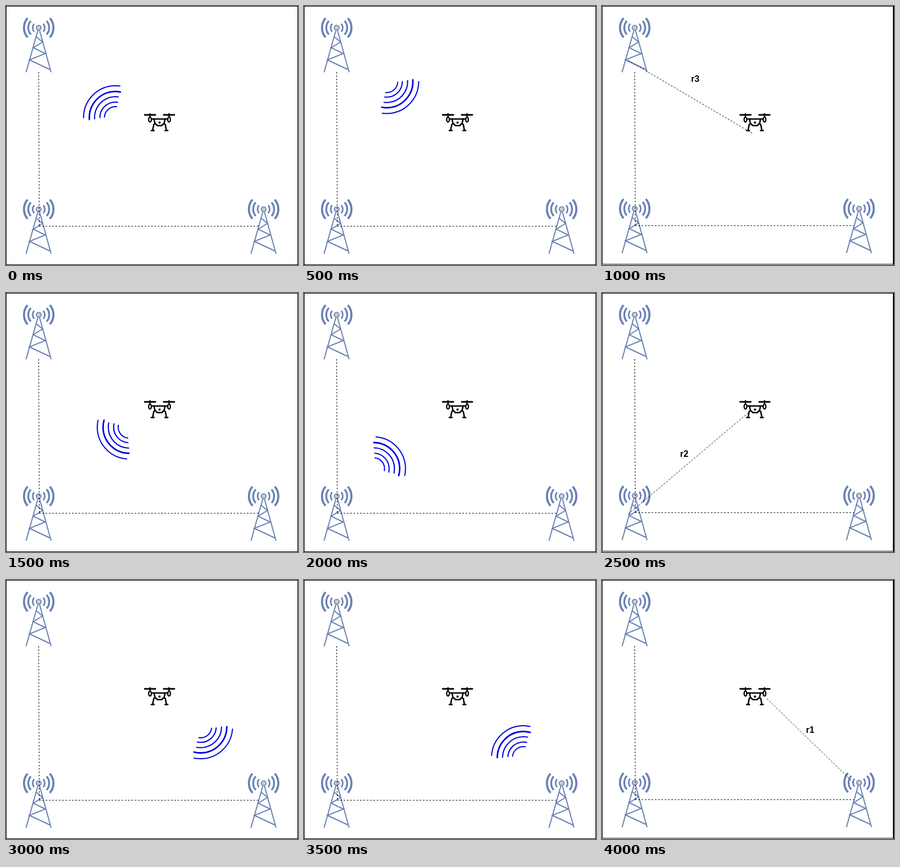
Write an HTML page with a canvas that moves like this. It is 531 by 471 pixels and loops after 4500 ms.

```html
<!DOCTYPE html>
<html lang="en">
<head>
<meta charset="utf-8">
<title>Drone ranging</title>
<style>
  html, body { margin: 0; width: 100%; height: 100%; overflow: hidden; background: #fff; }
  canvas { display: block; }
</style>
</head>
<body>
<canvas id="stage" width="531" height="471"></canvas>
<script>
const ctx = document.getElementById('stage').getContext('2d');
const STEP = 500;
const STEEL = '#6881b3';
const rad = deg => deg * Math.PI / 180;

// Each leg: signal sent, reply received, then the measured range.
const legs = [
  { send: [199, 203, 0], reply: [150.5, 137.5, 180],
    line: [48, 99, 274, 232], label: ['r3', 162, 138] },
  { send: [224, 244, -85.5], reply: [126.5, 319.5, 94.5],
    line: [48, 402, 268, 216], label: ['r2', 142, 298] },
  { send: [354, 267, -176], reply: [399, 323, 4],
    line: [300, 216, 460, 371], label: ['r1', 371, 278] }
];

// Radius, start angle, end angle, line width
const ripples = [
  [58, 180, 278, 2], [47.5, 176, 281, 2.8], [38, 177, 277.5, 2.1],
  [28.3, 180, 278, 2.1], [20, 183, 276, 2]
];

function pen(color, width, cap = 'butt') {
  ctx.strokeStyle = color;
  ctx.lineWidth = width;
  ctx.lineCap = cap;
}

function path(points, close) {
  ctx.beginPath();
  for (let i = 0; i < points.length; i += 2) ctx.lineTo(points[i], points[i + 1]);
  if (close) ctx.closePath();
  ctx.stroke();
}

function dashed(points) {
  pen('#000', 1);
  ctx.setLineDash([3, 3]);
  path(points);
  ctx.setLineDash([]);
}

function at(x, y, draw) {
  ctx.save();
  ctx.translate(x, y);
  draw();
  ctx.restore();
}

// Origin at the antenna
function tower() {
  pen(STEEL, 2);
  path([-1.5, 5, -23, 81]);
  path([1.5, 5, 22.5, 81]);
  path([-5, 16, 7, 26, -10, 36.5, 12, 47, -17, 58.5, 20.5, 76]);
  for (const [r, width] of [[11, 2.8], [19, 3.4], [26.8, 3.8]]) {
    pen(STEEL, width);
    for (const mid of [0, 180]) {
      ctx.beginPath();
      ctx.arc(0, 0, r, rad(mid - 41), rad(mid + 41));
      ctx.stroke();
    }
  }
  pen(STEEL, 1.8);
  ctx.fillStyle = '#ccc';
  ctx.beginPath();
  ctx.arc(0, 0, 4.4, 0, 7);
  ctx.fill();
  ctx.stroke();
}

function drone() {
  for (const side of [-1, 1]) {
    ctx.save();
    ctx.scale(side, 1);
    pen('#000', 2.8, 'round');
    path([7.5, -14, 27, -14]);
    pen('#000', 2.4, 'round');
    path([17.3, -16, 17.3, -11]);
    ctx.beginPath();
    ctx.ellipse(17.3, -5.5, 2.4, 4.4, 0, 0, 7);
    ctx.stroke();
    path([10, -6.5, 15, -6.5]);
    pen('#000', 2.6, 'round');
    path([8, 2, 10.5, 3.5, 12.5, 14]);
    path([10, 14.5, 15, 14.5]);
    ctx.restore();
  }
  pen('#000', 2.6, 'round');
  ctx.lineJoin = 'round';
  path([-10, -6.5, 10, -6.5, 8.5, 1, 4, 5.5, -4, 5.5, -8.5, 1], true);
  ctx.fillStyle = '#000';
  ctx.beginPath();
  ctx.arc(0, 0, 2.1, 0, 7);
  ctx.fill();
}

function waves([x, y, turn]) {
  at(x, y, () => {
    ctx.rotate(rad(turn));
    for (const [r, from, to, width] of ripples) {
      pen('#0000e0', width, 'round');
      ctx.beginPath();
      ctx.arc(0, 0, r, rad(from), rad(to));
      ctx.stroke();
    }
  });
}

// The range view is one pixel smaller each way.
function scene(inset) {
  ctx.fillStyle = '#fff';
  ctx.fillRect(0, 0, 531, 471);
  pen('#000', 1);
  ctx.strokeRect(0.5, 0.5, 530 - inset, 470 - inset);
  if (inset) {
    ctx.fillStyle = '#000';
    ctx.fillRect(530, 0, 1, 471);
  }
  at(59.5, 39.5, tower);
  at(59.5, 369.5 - inset, tower);
  at(468.5 - inset, 369.5 - inset, tower);
  dashed([59.5, 120, 60.5, 400 - inset]);
  dashed([60, 400.5 - inset, 459 - inset, 400.5 - inset]);
  at(279.2 - inset, 212, drone);
}

function range({ line, label }) {
  dashed(line);
  ctx.fillStyle = '#000';
  ctx.font = 'bold 16px "Liberation Sans", Arial, sans-serif';
  ctx.fillText(...label);
}

function frame() {
  const step = Math.floor(performance.now() / STEP) % 9;
  const leg = legs[Math.floor(step / 3)];
  const phase = step % 3;
  scene(phase === 2 ? 1 : 0);
  if (phase === 2) range(leg);
  else waves(phase ? leg.reply : leg.send);
  requestAnimationFrame(frame);
}
frame();
</script>
</body>
</html>
```
